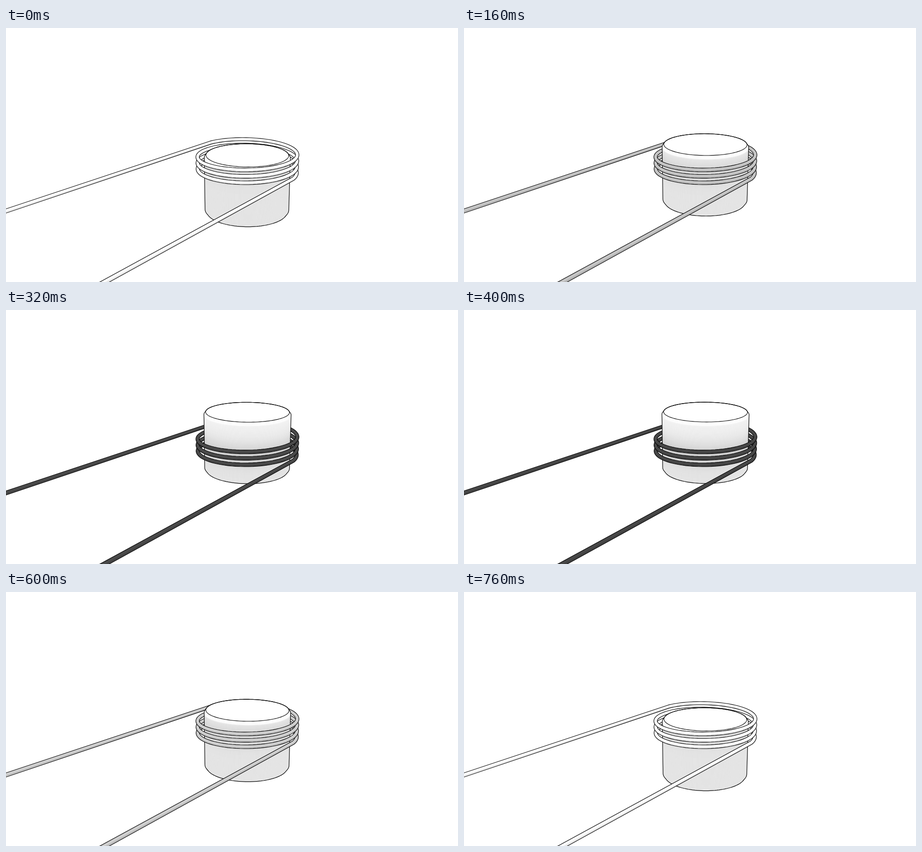
An HTML page with a canvas that plays this animation: 960 by 540 pixels, repeating every 0.8 s.

```html
<!DOCTYPE html>
<html lang="en">
<head>
<meta charset="utf-8">
<title>Rod in a coil</title>
<style>
  html, body { margin: 0; width: 100%; height: 100%; overflow: hidden; background: #fff; }
  canvas { display: block; }
</style>
</head>
<body>
<canvas id="stage" width="960" height="540"></canvas>
<script>
const ctx = document.getElementById('stage').getContext('2d');
const TAU = Math.PI * 2;

// Camera looking down on the vertical axis of the rod
const FOCAL = 1200, SIN = 0.28, COS = Math.sqrt(1 - SIN * SIN), AXIS = 32.4;
const project = (x, h, z) => {
  const k = FOCAL / (FOCAL - z * COS - h * SIN);
  return { x: 480 + (x + AXIS) * k, y: 270 - (h * COS - z * SIN) * k, k };
};
const ring = (radius, h) => Array.from({ length: 120 }, (_, i) =>
  project(radius * Math.cos(i / 120 * TAU), h, radius * Math.sin(i / 120 * TAU)));

const smooth = u => u * u * (3 - 2 * u);
const clamp = v => Math.max(0, Math.min(1, v));
const grey = v => `rgb(${v},${v},${v})`;
const toGrey = lin => {
  const v = clamp(lin);
  return grey(Math.round(255 * (v < 0.0031 ? v * 12.92 : 1.055 * v ** (1 / 2.4) - 0.055)));
};

function trace(points, closed) {
  ctx.beginPath();
  points.forEach(p => ctx.lineTo(p.x, p.y));
  if (closed) ctx.closePath();
}
function fill(points, color) {
  trace(points, true);
  ctx.fillStyle = color;
  ctx.fill();
}
function line(points, color, width, closed) {
  trace(points, closed);
  ctx.strokeStyle = color;
  ctx.lineWidth = width;
  ctx.stroke();
}

function hull(points) {
  const sorted = [...points].sort((a, b) => a.x - b.x || a.y - b.y);
  const half = list => {
    const out = [];
    for (const p of list) {
      while (out.length > 1) {
        const a = out[out.length - 2], b = out[out.length - 1];
        if ((b.x - a.x) * (p.y - a.y) - (b.y - a.y) * (p.x - a.x) > 0) break;
        out.pop();
      }
      out.push(p);
    }
    return out.slice(0, -1);
  };
  return [...half(sorted), ...half(sorted.reverse())];
}

// Wire: straight lead, helix, straight lead
const TURN = 80, FIRST = -51, LAST = 226, COIL = 105.5, PITCH = 13.2, RISE = 0.5, WIRE = 3.6;
const wire = [{ x: -20, y: 395.7, r: 4.3, i: FIRST - 1 }];
for (let i = FIRST; i <= LAST; i++) {
  const u = i / TURN;
  const p = project(-COIL * Math.sin(u * TAU), RISE - PITCH * u, COIL * Math.cos(u * TAU));
  wire.push({ x: p.x, y: p.y, r: WIRE * p.k, i });
}
wire.push({ x: 173, y: 560, r: 5, i: LAST + 1 });
wire.forEach((p, n) => {
  const a = wire[Math.max(0, n - 1)], b = wire[Math.min(wire.length - 1, n + 1)];
  const d = Math.hypot(b.x - a.x, b.y - a.y);
  p.nx = (a.y - b.y) / d;
  p.ny = (b.x - a.x) / d;
});
const offset = (points, side) =>
  points.map(p => ({ x: p.x + p.nx * p.r * side, y: p.y + p.ny * p.r * side }));
const piece = (from, to) => {
  const points = wire.filter(p => p.i >= from && p.i <= to);
  return {
    left: offset(points, 1),
    right: offset(points, -1),
    shine: points.map(p => ({ x: p.x, y: p.y - p.r * 0.3 })),
    width: points[points.length >> 1].r
  };
};
const backs = [3, 2, 1, 0].map(k => piece(TURN * k - 60, TURN * k - 20));
const fronts = [3, 2, 1, 0].map(k => piece(TURN * k - 20, TURN * k + 20));

function drawWire(part, light) {
  fill([...part.left, ...[...part.right].reverse()], toGrey(light * 0.86));
  line(part.shine, toGrey(light * 1.06), part.width * 1.1);
  line(part.left, '#000', 1.1);
  line(part.right, '#000', 1.1);
}

const BODY = 91.2, RIM = 87.6, BEVEL = 5, LENGTH = 128;
function drawRod(top, lift) {
  const base = top - LENGTH;
  const outline = hull([
    ...ring(RIM, top), ...ring(BODY, top - BEVEL),
    ...ring(BODY, base + BEVEL), ...ring(RIM, base)
  ]);
  const shade = h => {
    const side = 228 + 14 * clamp((h + 10) / 60)
      - (10 + 12 * lift) * Math.exp(-(((h + 12) / 25) ** 2));
    return side + (253 - side) * clamp((h - top + 9) / 3);
  };
  ctx.save();
  trace(outline, true);
  ctx.clip();
  fill(outline, grey(Math.round(shade(base))));
  for (let h = base; h < top; h++) {
    const inset = Math.max(0, base + BEVEL - h, h - top + BEVEL) / BEVEL;
    fill(ring(BODY - (BODY - RIM) * inset, h), grey(Math.round(shade(h))));
  }
  ctx.restore();
  const rim = ring(RIM, top);
  fill(rim, '#fff');
  line(rim, '#000', 1.1, true);
  line(outline, '#000', 1.2, true);
}

const LOOP = 800, STEP = 40, PEAK = 360, END = 760;
function draw(time) {
  const t = Math.floor((time % LOOP) / STEP) * STEP;
  const lift = smooth(t < PEAK ? t / PEAK : clamp((END - t) / (END - PEAK)));
  const light = 0.97 - 0.93 * lift - 0.18 * lift * (1 - lift);
  ctx.fillStyle = '#fff';
  ctx.fillRect(0, 0, 960, 540);
  ctx.lineJoin = 'round';
  backs.forEach(part => drawWire(part, light));
  drawRod(1 + 56.6 * lift, lift);
  fronts.forEach(part => drawWire(part, light));
}

const start = performance.now();
function tick() {
  draw(performance.now() - start);
  requestAnimationFrame(tick);
}
tick();
</script>
</body>
</html>
```
